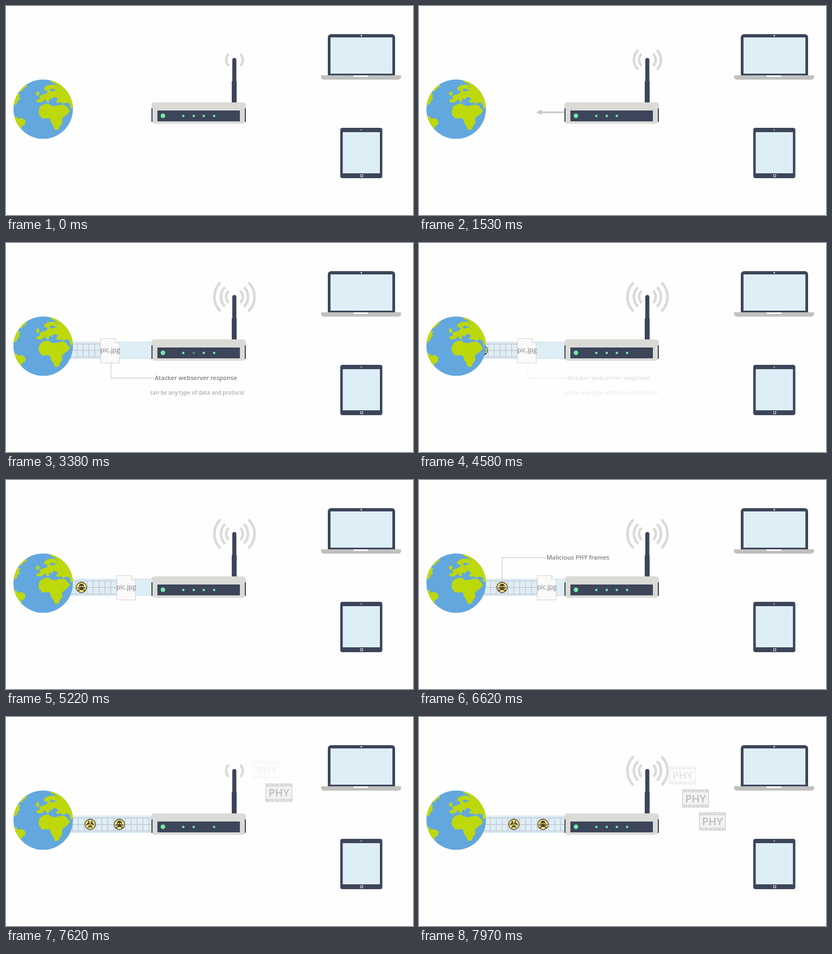
Write an HTML page with a canvas that moves like this. It is 750 px wide and 386 px high and loops after 8000 ms.

```html
<!DOCTYPE html>
<html lang="en">
<head>
<meta charset="utf-8">
<title>Network packets</title>
<style>
html, body { margin: 0; width: 100%; height: 100%; overflow: hidden; background: #fefefe; }
canvas { display: block; }
</style>
</head>
<body>
<canvas id="stage" width="750" height="386"></canvas>
<script>
const c = document.getElementById('stage').getContext('2d');
const LOOP = 8000, TAU = Math.PI * 2;
const DARK = '#3c4559', SCREEN = '#deeef6', PALE = '#dadbd7', GREY = '#c8c8c8';
const SANS = '"Open Sans", "Noto Sans", sans-serif';

const clamp = v => Math.max(0, Math.min(1, v));
const ramp = (t, a, b) => clamp((t - a) / (b - a));
const pulse = (t, a, b, d, e) => ramp(t, a, b) * (1 - ramp(t, d, e));

// Linear interpolation through [time, value] pairs
function track(keys, t) {
  let i = 1;
  while (i < keys.length - 1 && t > keys[i][0]) i++;
  const [a, x] = keys[i - 1], [b, y] = keys[i];
  return x + (y - x) * ramp(t, a, b);
}

function box(x, y, w, h, r, fill) {
  c.fillStyle = fill;
  c.beginPath();
  c.roundRect(x, y, w, h, r);
  c.fill();
}

function dot(x, y, r, fill) {
  c.fillStyle = fill;
  c.beginPath();
  c.arc(x, y, r, 0, TAU);
  c.fill();
}

function line(color, width, ...pts) {
  c.strokeStyle = color;
  c.lineWidth = width;
  c.beginPath();
  for (let i = 0; i < pts.length; i += 2) c.lineTo(pts[i], pts[i + 1]);
  c.stroke();
}

function text(str, x, y, size, weight, color, align = 'left') {
  c.font = `${weight} ${size}px ${SANS}`;
  c.fillStyle = color;
  c.textAlign = align;
  c.fillText(str, x, y);
}

function faded(alpha, draw) {
  if (alpha <= 0) return;
  c.save();
  c.globalAlpha *= alpha;
  draw();
  c.restore();
}

function arrow(x0, y0, x1, y1, p) {
  if (p <= 0) return;
  const len = Math.hypot(x1 - x0, y1 - y0) * p;
  c.save();
  c.translate(x0, y0);
  c.rotate(Math.atan2(y1 - y0, x1 - x0));
  line(GREY, 3, 0, 0, Math.max(0, len - 9), 0);
  c.fillStyle = GREY;
  c.beginPath();
  c.moveTo(len, 0);
  c.lineTo(len - 11, -5);
  c.lineTo(len - 11, 5);
  c.fill();
  c.restore();
}

const land = new Path2D(
  // Americas
  'M10 166L20 160L26 163L24 168L26 172L21 176L20 181L14 184L8 184Z' +
  'M20 160L26 151L38 144L38 149L32 153L29 158L24 157Z' +
  'M8 201L19 204L22 208L30 207L36 212L35 219L29 222L28 231L20 228Z' +
  // Europe and Asia
  'M80 130L130 150L128 190L122 187L119 190L117 180L111 178L106 181L101 178L95 179L92 176L96 172L92 168L86 169' +
  'L85 173L80 171L79 177L75 178L73 172L69 175L65 178L58 178L55 174L63 171L61 166L67 164L73 162L77 159L75 156' +
  'L70 155L71 150L78 146L88 145L94 148L95 153L90 155L84 152L80 155L84 158L92 156L96 150L90 143L82 140Z' +
  'M55 160L60 157L62 163L57 167Z' +
  // Africa and Arabia
  'M62 187L68 182L78 180L83 184L91 185L98 183L104 182L110 184L115 190L118 194L113 200L106 205L103 209L104 216' +
  'L100 221L97 228L90 229L87 221L83 216L82 210L79 207L67 208L61 201L60 195Z'
);

function globe() {
  c.save();
  c.beginPath();
  c.arc(68.5, 190.5, 54.8, 0, TAU);
  c.fillStyle = '#63a7df';
  c.fill();
  c.clip();
  c.fillStyle = '#bdd80b';
  c.fill(land);
  c.restore();
}

function laptop() {
  box(593, 52, 124, 78, [6, 6, 0, 0], DARK);
  box(598, 58, 114, 67, 0, SCREEN);
  dot(654.7, 55, 1.4, '#e8e8e8');
  box(580.5, 128, 147.5, 8, [0, 0, 5, 5], '#c0c0bf');
  box(640, 128, 28, 3, [0, 0, 3, 3], '#fafafa');
}

function tablet() {
  box(616, 225, 77.5, 93, 4, DARK);
  box(620.5, 233, 68.5, 76, 0, SCREEN);
  dot(654.7, 229, 1.4, '#9aa0ab');
  c.strokeStyle = '#e8e8e8';
  c.lineWidth = 1;
  c.strokeRect(653.5, 311.5, 4, 4);
}

// [lamp, dims at, lights again, lowest brightness]
const blinks = [
  [1, 280, 460, 0], [3, 580, 780, 0], [2, 890, 1070, 0], [3, 1400, 1640, 0],
  [1, 2230, 2400, 0], [2, 2660, 2860, 0], [1, 3300, 4440, .4],
  [1, 5260, 5440, .2], [3, 6680, 6880, 0], [2, 7540, 7740, 0]
];

function router(t) {
  box(417, 96, 7.5, 50, [4, 4, 0, 0], DARK);
  box(416, 139, 9, 40, 1, DARK);
  box(268, 189, 174, 25, 0, DARK);
  box(270, 185, 170, 32.5, [0, 0, 4, 4], PALE);
  box(268, 178, 174, 11, [5, 5, 0, 0], PALE);
  box(279, 193, 152, 20, 0, DARK);
  dot(289.2, 202.7, 4.2, '#72eca8');
  [326.7, 346, 364.5, 383.5].forEach((x, i) => {
    let on = 1;
    for (const [lamp, a, b, low] of blinks)
      if (lamp === i) on -= (1 - low) * pulse(t, a, a + 50, b - 50, b);
    faded(on, () => dot(x, 203, 2.2, '#72eca8'));
  });
}

// [time, rings shown]
const stages = [
  [0, 1], [240, 2], [480, 3], [890, 1], [1080, 2], [1700, 3],
  [2180, 1], [2300, 2], [2430, 3], [2990, 1], [3110, 2], [3240, 3],
  [6700, 1], [6960, 2], [7300, 3], [7500, 1], [7680, 2], [7860, 3]
];

function waves(t) {
  const n = stages.filter(s => s[0] <= t).pop()[1];
  c.strokeStyle = PALE;
  c.lineWidth = 4.8;
  [15.3, 25, 37].slice(0, n).forEach(r => {
    for (const mid of [0, Math.PI]) {
      c.beginPath();
      c.arc(421, 99.5, r, mid - .8, mid + .8);
      c.stroke();
    }
  });
}

function badge(x, draw) {
  const ink = '#46402f';
  c.save();
  c.translate(x, 198.3);
  dot(0, 0, 10.2, ink);
  dot(0, 0, 8.9, '#fae87c');
  draw(ink);
  c.restore();
}

function skull(ink) {
  line(ink, 1.7, -6, 1, 6, 6);
  line(ink, 1.7, 6, 1, -6, 6);
  for (const s of [-1, 1]) {
    dot(s * 6, 1, 1.2, ink);
    dot(s * 6, 6, 1.2, ink);
  }
  dot(0, -2.2, 4.6, ink);
  box(-2.6, 0, 5.2, 4.4, 1, ink);
  dot(-1.9, -1.6, 1.3, '#fae87c');
  dot(1.9, -1.6, 1.3, '#fae87c');
}

function biohazard(ink) {
  c.strokeStyle = ink;
  for (let i = 0; i < 3; i++) {
    c.save();
    c.rotate(i * TAU / 3);
    c.lineWidth = 1.8;
    c.beginPath();
    c.arc(0, -3.7, 3.4, -.95, Math.PI + .95);
    c.stroke();
    c.restore();
  }
  c.lineWidth = 1;
  c.beginPath();
  c.arc(0, 0, 3.9, 0, TAU);
  c.stroke();
  dot(0, 0, 1.1, '#fae87c');
}

function tube() {
  box(100, 182.5, 170, 31.5, 0, SCREEN);
  line('#cfe0ea', 1, 100, 183, 270, 183);
  line('#cfe0ea', 1, 100, 213.5, 270, 213.5);
}

function strip(edge) {
  const mid = edge - 99.5, ink = '#bab9c7', end = Math.min(edge - 5, 270);
  if (end < 100) return;
  for (const y of [186.5, 198.5, 210.5]) line(ink, 1, 100, y, end, y);
  for (let k = -15; k < 9; k++) {
    const x = mid + k * 10.8;
    if (x > 100 && x < end) line(ink, 1, x, 186, x, 211);
  }
  if (mid > 90) badge(mid, skull);
  if (mid > 144) badge(mid - 53.8, biohazard);
}

function file(edge) {
  const l = edge - 34.5, top = 176.5, low = 221.5, fold = 8;
  c.beginPath();
  c.moveTo(l, top);
  c.lineTo(edge - fold, top);
  c.lineTo(edge, top + fold);
  c.lineTo(edge, low);
  c.lineTo(l, low);
  c.closePath();
  c.fillStyle = '#fafafa';
  c.fill();
  c.strokeStyle = '#d4d4d4';
  c.lineWidth = 1;
  c.stroke();
  line('#d4d4d4', 1, edge - fold, top, edge - fold, top + fold, edge, top + fold);
  text('pic.jpg', edge - 17, 202.3, 12, 500, '#7c7c7c', 'center');
}

function packet(x, y) {
  box(x, y, 49, 33.5, 0, '#f2f2f1');
  c.strokeStyle = '#c6c6c5';
  c.lineWidth = 1;
  c.strokeRect(x + .5, y + .5, 48, 32.5);
  for (const dy of [4.5, 29]) line('#c6c6c5', 1, x, y + dy, x + 49, y + dy);
  for (const dy of [2.5, 31]) {
    c.setLineDash([6, 2]);
    line('#d3d3d2', 2, x + 2, y + dy, x + 47, y + dy);
    c.setLineDash([]);
  }
  text('PHY', x + 24.5, y + 24, 19.5, 600, '#bdbdbc', 'center');
}

function packets(t) {
  for (let i = 0; i < 3; i++) {
    const u = (t - 7410) / 280 - i;
    faded(clamp((u + .4) * .85), () => packet(461 + 20.5 * u + 3.5 * u * u, 91 + 42.5 * u));
  }
}

function notes(t, edge) {
  const x = edge - 15.5, s = edge - 99.5;
  faded(pulse(t, 2780, 3060, 4380, 4640), () => {
    line('#cfcfcf', 1.3, x, 222, x, 249.5, 273, 249.5);
    text('Atacker webserver response', 274, 253.2, 11.1, 600, '#7d7d7d');
  });
  faded(pulse(t, 3000, 3360, 4380, 4640), () =>
    text('can be any type of data and protocol', 265.5, 280, 9.85, 600, '#adadad'));
  faded(pulse(t, 5260, 5600, 6620, 6860), () => {
    line('#cfcfcf', 1.3, s, 187.5, s, 143.5, 233, 143.5);
    text('Malicious PHY frames', 235, 147.2, 11.1, 600, '#7d7d7d');
  });
}

// Right edge of the travelling file; the strip follows it
const travel = [
  [2130, 113], [2480, 140], [3380, 209], [4380, 209], [5220, 238.5],
  [5620, 252.5], [6620, 252.5], [7220, 286], [7970, 328], [8000, 329.7]
];

function render(t) {
  c.fillStyle = '#fefefe';
  c.fillRect(0, 0, 750, 386);
  const edge = track(travel, t);

  faded(1 - ramp(t, 880, 1090), () => arrow(615, 269, 450, 203, ramp(t, 40, 820)));
  faded(1 - ramp(t, 1330, 1430), () => arrow(579, 134, 450, 184, ramp(t, 40, 820)));
  faded(1 - ramp(t, 2130, 2300), () => arrow(269, 196.3, 125, 196.3, ramp(t, 1330, 1870)));

  faded(ramp(t, 2130, 2330), tube);
  if (t >= 2130) {
    strip(edge);
    faded(1 - ramp(t, 6620, 6920), () => file(edge));
  }
  notes(t, edge);
  globe();
  waves(t);
  router(t);
  packets(t);
  laptop();
  tablet();
}

const start = performance.now();
function tick() {
  render((performance.now() - start) % LOOP);
  requestAnimationFrame(tick);
}
tick();
</script>
</body>
</html>
```
